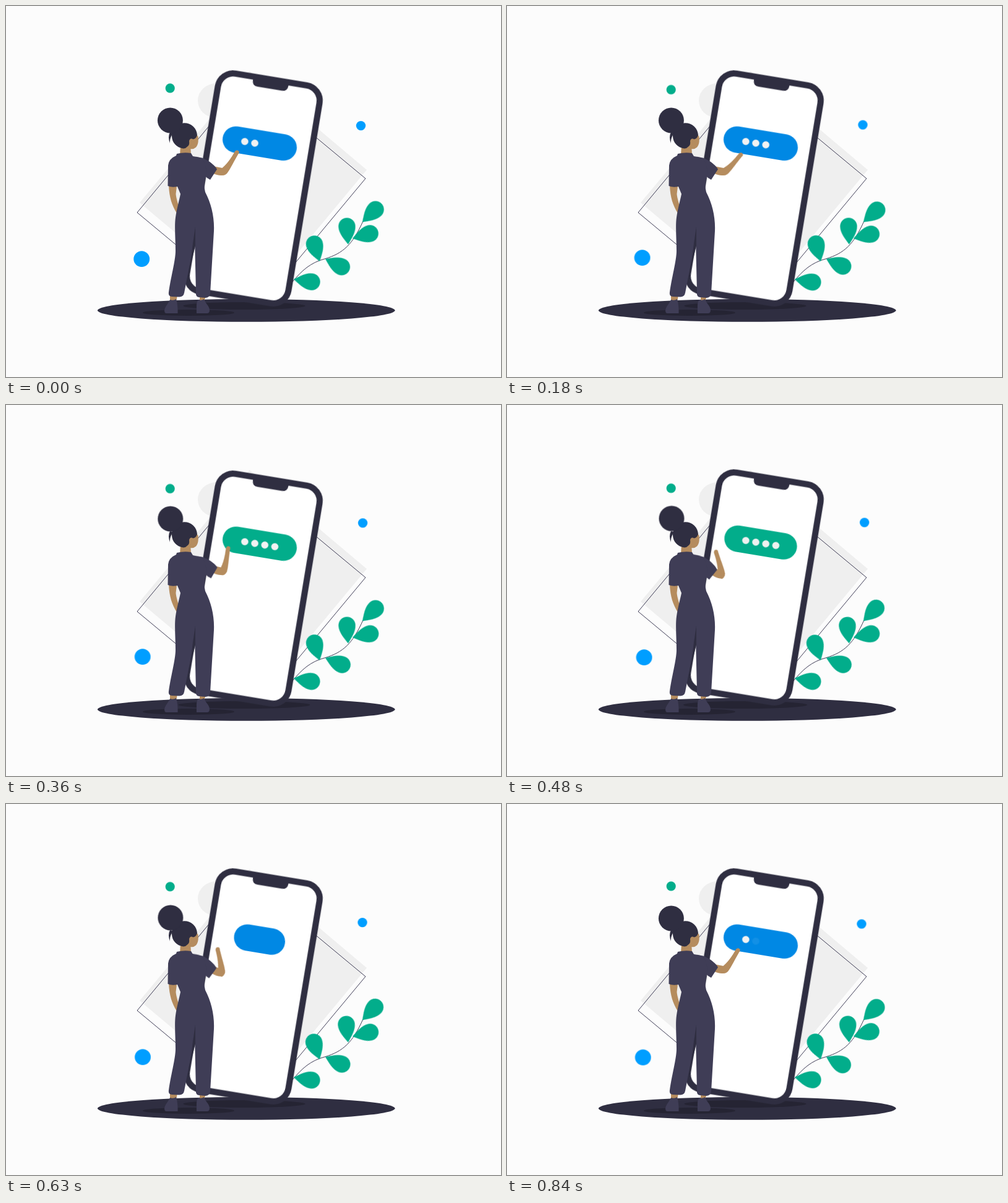
Animation, 800 px wide and 600 px high, one loop 870 ms. Source, as an HTML page without scripts:

```html
<!DOCTYPE html>
<html lang="en">
<head>
<meta charset="utf-8">
<title>Passcode entry</title>
<style>
  html, body { margin: 0; width: 100%; height: 100%; overflow: hidden; background: #fcfcfc; }
  svg { display: block; width: 100vw; height: 100vh; }

  .ink { fill: #2f2e41; }
  .suit { fill: #3f3d56; }
  .skin { fill: #b58c5e; }
  .leaf, .green { fill: #02ad8b; }
  .blue { fill: #009eff; }
  .grey { fill: #efefef; }
  .thin { fill: none; stroke: #3f3d56; stroke-width: 1; }

  [class*="move-"] { animation: 870ms linear infinite; }
  .move-press { animation-name: press; }
  .move-shadow { animation-name: shadow; transform-origin: 385px 485px; }
  .move-pill { animation-name: pill; }
  .move-dot { animation-name: var(--show); fill: #f2f2f2; }
  .move-arm { animation-name: arm; transform-origin: 320px 252px; }
  .move-sleeve { animation-name: sleeve; transform-origin: 316px 252px; }
  .move-forearm { animation-name: forearm; transform-origin: 351px 268px; }
  .move-bun { animation-name: bun; }
  .move-sway { animation-name: sway; }
  .move-dip { animation-name: dip; }
  .move-bob { animation-name: bob; }
  .move-drift { animation-name: drift; }
  .move-orbit { animation-name: orbit; }

  @keyframes press {
    0%, 32% { transform: none; }
    38% { transform: translateY(2.6px); }
    41.4% { transform: translateY(2px); }
    49% { transform: translateY(-.6px); }
    55.2%, 100% { transform: none; }
  }
  @keyframes shadow {
    0%, 32% { transform: none; }
    38%, 41.4% { transform: scaleX(1.08); }
    55.2% { transform: scaleX(1.015); }
    62%, 100% { transform: none; }
  }
  @keyframes pill {
    0%, 34.5% { x: -62px; y: -94.7px; width: 121px; fill: #0088e4; }
    37.9%, 51.7% { x: -62px; y: -94.7px; width: 121px; fill: #02ad8b; }
    55.2% { x: -60.7px; width: 118.4px; animation-timing-function: ease-in; }
    63.7% { x: -24.4px; y: -94.7px; width: 42.7px; fill: #02ad8b; }
    63.8%, 65.5% { x: -24.4px; y: -101px; width: 42.7px; fill: #0088e4; animation-timing-function: ease-in-out; }
    79.3%, 100% { x: -62px; y: -94.7px; width: 121px; fill: #0088e4; }
  }
  @keyframes dot1 {
    0%, 55.2% { opacity: 1; }
    61%, 80.5% { opacity: 0; }
    85%, 100% { opacity: 1; }
  }
  @keyframes dot2 {
    0%, 55.2% { opacity: 1; }
    61%, 96.4% { opacity: 0; }
    100% { opacity: 1; }
  }
  @keyframes dot3 {
    0%, 12.6% { opacity: 0; }
    17%, 55.2% { opacity: 1; }
    61%, 100% { opacity: 0; }
  }
  @keyframes dot4 {
    0%, 27.6% { opacity: 0; }
    32%, 55.2% { opacity: 1; }
    61%, 100% { opacity: 0; }
  }

  @keyframes arm {
    0%, 27.6% { transform: none; animation-timing-function: ease-in; }
    41.4% { transform: rotate(2deg); animation-timing-function: ease-out; }
    55.2%, 65.5% { transform: rotate(14deg); animation-timing-function: ease-in-out; }
    84%, 100% { transform: none; }
  }
  @keyframes sleeve {
    0%, 27.6% { transform: none; }
    41.4% { transform: rotate(-3deg); }
    55.2%, 65.5% { transform: rotate(6deg); }
    82%, 100% { transform: none; }
  }
  @keyframes forearm {
    0% { transform: none; animation-timing-function: ease-in-out; }
    20.7%, 27.6% { transform: rotate(9deg); animation-timing-function: ease-in; }
    41.4% { transform: rotate(-24deg); animation-timing-function: ease-out; }
    55.2%, 65.5% { transform: rotate(-62deg); animation-timing-function: ease-in-out; }
    93%, 100% { transform: none; }
  }
  @keyframes bun {
    0%, 20% { transform: none; }
    56%, 66% { transform: translate(.6px, -1.5px); }
    92%, 100% { transform: none; }
  }
  @keyframes sway {
    0% { transform: none; }
    20.7%, 28% { transform: rotate(2.2deg); }
    55.2%, 83% { transform: rotate(-1.8deg); }
    100% { transform: none; }
  }
  @keyframes dip {
    0% { transform: none; }
    41.4%, 58% { transform: rotate(var(--dip)); }
    90%, 100% { transform: none; }
  }
  @keyframes bob {
    0%, 100% { transform: none; }
    20.7%, 41.4% { transform: translateY(2.4px); }
    65.5% { transform: translateY(1.2px); }
    83% { transform: translateY(.2px); }
  }
  @keyframes drift {
    0%, 100% { transform: none; }
    41.4% { transform: translate(3.1px, -2.8px); }
    55.2% { transform: translate(4.2px, -3.6px); }
    65.5% { transform: translate(4.1px, -3px); }
    83% { transform: translate(.2px, -.4px); }
    96.5% { transform: translate(-.5px, .4px); }
  }
  @keyframes orbit {
    0%, 100% { transform: none; }
    20.7% { transform: translate(-.6px, -2px); }
    41.4% { transform: translate(1.5px, -2px); }
    55.2% { transform: translate(2.4px, -1px); }
    65.5% { transform: translate(2.1px, -.3px); }
    83% { transform: translate(1.3px, .8px); }
    96.5% { transform: translate(.6px, .7px); }
  }
</style>
</head>
<body>
<svg viewBox="0 0 800 600" xmlns="http://www.w3.org/2000/svg">
  <defs>
    <path id="leaf" d="M0 0C-6-9-13.7-18-13.7-29.3A13.7 13.7 0 0 1 13.7-29.3C13.7-18 6-9 0 0Z"/>
    <circle id="dot" r="5.8"/>
  </defs>

  <!-- backdrop -->
  <ellipse class="grey" cx="340" cy="153" rx="30" ry="28"/>
  <path class="grey" d="M216 318 393.5 105 583 265 406 478Z"/>
  <path class="thin" d="M212 334 389.7 120 581 279 403 493Z"/>
  <circle class="green move-bob" cx="265.2" cy="132.8" r="7.6"/>
  <circle class="blue move-drift" cx="573.5" cy="193.6" r="7.7"/>
  <circle class="blue move-orbit" cx="219.2" cy="409.2" r="12.9"/>

  <!-- plant -->
  <path class="thin" d="M463 446C478 428 492 415 515 409C545 400 560 386 577 348"/>
  <g class="leaf">
    <g transform="translate(465 442) rotate(98)"><use href="#leaf" class="move-dip" style="--dip:2deg"/></g>
    <g transform="translate(507 413) rotate(-17)"><use href="#leaf" class="move-sway"/></g>
    <g transform="translate(516 409) rotate(116)"><use href="#leaf" class="move-dip" style="--dip:-4deg"/></g>
    <g transform="translate(553 385.5) rotate(-4)"><use href="#leaf" class="move-sway"/></g>
    <g transform="translate(560 376) rotate(74)"><use href="#leaf" class="move-dip" style="--dip:4deg"/></g>
    <g transform="translate(576 349.5) rotate(46)"><use href="#leaf" class="move-sway"/></g>
  </g>

  <!-- ground -->
  <ellipse class="ink" cx="388.3" cy="492.3" rx="240.3" ry="18.5"/>
  <g fill="#252433">
    <ellipse class="move-shadow" cx="385" cy="485" rx="98.5" ry="6"/>
    <ellipse cx="295" cy="496" rx="74" ry="5"/>
  </g>

  <!-- phone -->
  <g class="move-press">
    <g transform="translate(399.5 295) rotate(9.4)">
      <rect x="-83.2" y="-178.6" width="166.4" height="357.2" rx="25" fill="#fff" stroke="#2f2e41" stroke-width="10"/>
      <path class="ink" d="M-29-176H29V-172.5Q29-163.5 20-163.5H-20Q-29-163.5-29-172.5Z"/>
      <rect class="move-pill" x="-62" y="-94.7" width="121" height="42.7" rx="21.35"/>
      <g transform="translate(-1.2 -72.6)">
        <use href="#dot" x="-24.6" class="move-dot" style="--show:dot1"/>
        <use href="#dot" x="-8.2" class="move-dot" style="--show:dot2"/>
        <use href="#dot" x="8.2" class="move-dot" style="--show:dot3"/>
        <use href="#dot" x="24.6" class="move-dot" style="--show:dot4"/>
      </g>
    </g>
  </g>

  <!-- feet and resting arm -->
  <path class="skin" d="M265 468H277L275 478H265ZM313 469H323L320 478H313Z"/>
  <path class="suit" d="M256 492C257 486 263 480 265 475Q271 477 275 474C277 480 278 490 277.500 497H259Q256 497 256 492ZM308 497V484Q308 478 311 475Q316 477 320 474C322 481 329 485 329 492Q329 497 325 497Z"/>
  <path class="skin" d="M263 290 276 291 274.500 304C275 312 279 320 280 331L276 335C268 322 264 310 263 290Z"/>

  <!-- reaching arm -->
  <g class="move-arm">
    <path class="skin" d="M329 258 350 262Q357 266 354 273Q345 276 333 270Z"/>
    <path class="skin move-forearm" d="M346 265C356 257 364 246 370 235Q373 232 376 234.500Q378 237 375 240C369 250 363 263 357 271Q353 275 347 273Z"/>
  </g>
  <path class="suit move-sleeve" d="M300 243C310 244 318 245 324 249C332 253 338 259 341 264L330 281Q325 279 321 274L303 265Z"/>

  <!-- head -->
  <path class="skin" d="M306 206 310.500 211C311 218 311 224 307 228.500Q303 232 298.500 231L299 241H281L282 226Z"/>
  <path class="ink" d="M268 210.500A20.500 20.500 0 0 1 309 209Q307 215 302 215.500C300 213.500 296 215 296 219Q297 225 293 227.500Q290 231 286 230.500A20.500 20.500 0 0 1 268 210.500Z"/>
  <path class="ink" d="M265 204Q261 212 265 222Q264 213 271 205Z"/>
  <circle class="ink move-bun" cx="265.4" cy="185" r="20.5"/>

  <!-- overall -->
  <path class="suit" d="M276 239Q288 236 299 238L302 243 316 247C323 253 325 266 322 278Q319 290 322 301C332 320 337 342 336 364L330 465Q329 472 322 472L312 471Q306 470 307 463L305 376 288 464Q287 470 280 470.500L268 470Q262 470 263 463C266 440 274 412 274 396C274 376 272 356 274 342C276 328 280 314 282 304L277 292Q268 294 261.500 291L262 258Q263 247 275 242Z"/>
  <path class="ink" d="M306 357Q302 382 299 408L293 441 306 388Z"/>
</svg>
</body>
</html>
```
